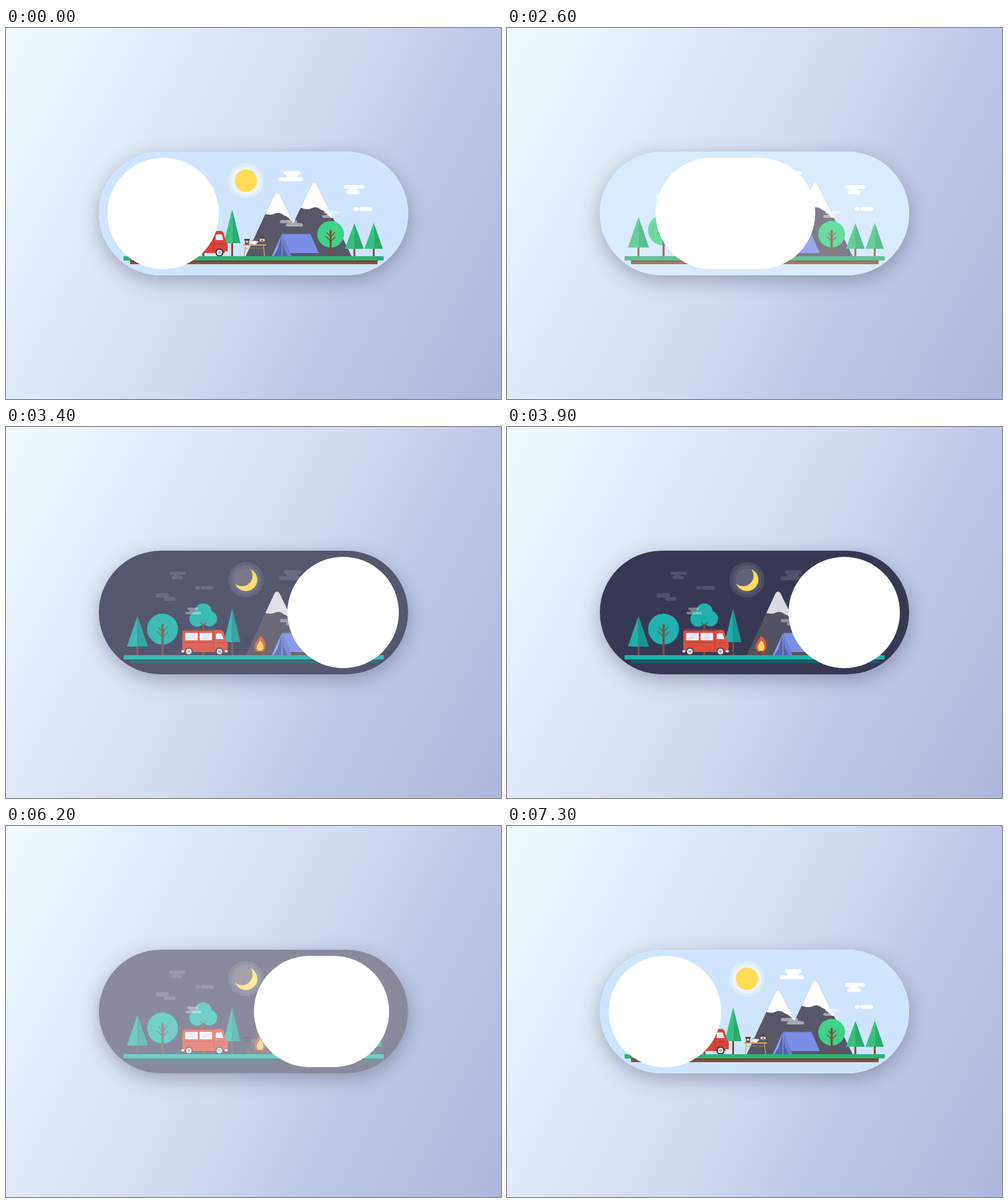
Animation, 800 px wide and 600 px high, one loop 7.4 s. Source, as an HTML page with a canvas:

```html
<!DOCTYPE html>
<html lang="en">
<head>
<meta charset="utf-8">
<title>Day and night switch</title>
<style>
  html, body { margin: 0; width: 100%; height: 100%; overflow: hidden; }
  canvas { display: block; width: 800px; height: 600px; }
</style>
</head>
<body>
<canvas id="stage" width="800" height="600"></canvas>
<script>
const LOOP = 7400;
const ctx = document.getElementById('stage').getContext('2d');

const DAY = {
  sky: '#cfe5ff', halo: '#dfedfb', ring: '#ecf4fa', disc: '#ffdc55',
  cloud: '#ffffff', mist: 'rgba(255,255,255,.48)',
  rock: '#575767', snow: '#ffffff',
  leaf: '#3dd286', pineL: '#36c27d', pineR: '#2cab6d', trunk: '#7f4c36',
  grass: '#2eb277', soil: '#8b4f3b', soilTop: '#6f3d2e',
  van: '#d7443a', rack: '#74383a', tyre: '#35333f', hub: '#f3f3f6'
};
const NIGHT = {
  sky: '#373854', halo: '#4a4b64', ring: '#57586f', disc: '#62627a',
  cloud: '#50516a', mist: 'rgba(255,255,255,.35)',
  rock: '#535260', snow: '#dadae0',
  leaf: '#20b0ad', pineL: '#20aeaa', pineR: '#1a9697', trunk: '#6b5549',
  grass: '#1fb0ac', soil: '#1c5f6b', soilTop: '#1a5763',
  van: '#da4f40', rack: '#6b4048', tyre: '#4a4654', hub: '#e6e6ec'
};

function circle(c, x, y, r, color) {
  c.fillStyle = color;
  c.beginPath();
  c.arc(x, y, r, 0, Math.PI * 2);
  c.fill();
}

function box(c, x1, y1, x2, y2, color, r = 0) {
  c.fillStyle = color;
  c.beginPath();
  c.roundRect(x1, y1, x2 - x1, y2 - y1, r);
  c.fill();
}

function poly(c, color, ...p) {
  c.fillStyle = color;
  c.beginPath();
  for (let i = 0; i < p.length; i += 2) c.lineTo(p[i], p[i + 1]);
  c.closePath();
  c.fill();
}

function line(c, color, width, ...p) {
  c.strokeStyle = color;
  c.lineWidth = width;
  c.beginPath();
  for (let i = 0; i < p.length; i += 2) c.lineTo(p[i], p[i + 1]);
  c.stroke();
}

const bar = (c, x1, y1, x2, y2, color) => box(c, x1, y1, x2, y2, color, (y2 - y1) / 2);

// Two bars joined by a narrower bridge
function cloud(c, color, x, y, top, dx, bottom, h, gap) {
  c.fillStyle = color;
  const low = y + h + gap, mid = x + Math.max(0, dx) + 4;
  const midW = Math.min(top, bottom) - 9;
  c.beginPath();
  c.roundRect(x, y, top, h, h / 2);
  c.roundRect(x + dx, low, bottom, h, h / 2);
  c.rect(mid, y + h - .5, midW, gap + 1);
  c.fill();
}

function luminary(c, p, night) {
  circle(c, 387.8, 247, 28.5, p.halo);
  circle(c, 387.8, 247, 23.5, p.ring);
  circle(c, 387.8, 247, 18, p.disc);
  if (!night) return;
  c.save();
  c.beginPath();
  c.arc(387.8, 247, 18.5, 0, Math.PI * 2);
  c.clip();
  c.fillStyle = '#fddc5e';
  c.beginPath();
  c.rect(360, 220, 60, 60);
  c.arc(381.5, 240.5, 17, 0, Math.PI * 2);
  c.fill('evenodd');
  c.restore();
}

function mountain(c, p, x, y, left, right, snow) {
  c.save();
  c.beginPath();
  c.moveTo(left, 370);
  c.lineTo(x - 4, y + 3);
  c.quadraticCurveTo(x, y - 3, x + 4, y + 3);
  c.lineTo(right, 370);
  c.closePath();
  c.fillStyle = p.rock;
  c.fill();
  c.clip();
  c.fillStyle = p.snow;
  c.beginPath();
  c.moveTo(x, y - 5);
  c.lineTo(x - 40, y - 5);
  c.lineTo(x - 40, snow);
  c.lineTo(x - 21, snow);
  c.quadraticCurveTo(x - 10, snow + 4, x - 3, snow);
  c.quadraticCurveTo(x + 4, snow - 3, x + 11, snow + 3);
  c.quadraticCurveTo(x + 18, snow + 5, x + 27, snow + 16);
  c.lineTo(x + 45, snow + 16);
  c.lineTo(x + 45, y - 5);
  c.fill();
  c.restore();
}

function pine(c, p, x, top, base, half) {
  box(c, x - 1.5, base - 1, x + 1.5, 370, p.trunk);
  poly(c, p.pineL, x, top, x, base, x - half, base);
  poly(c, p.pineR, x, top, x + half, base, x, base);
}

function roundTree(c, p, x, y, r) {
  const k = r / 25;
  circle(c, x, y, r, p.leaf);
  box(c, x - 1.7, y - 8 * k, x + 1.7, 370, p.trunk, 1);
  line(c, p.trunk, 1.5, x - 9 * k, y + 4 * k, x, y + 13 * k, x + 9 * k, y + 5 * k);
  line(c, p.trunk, 1.5, x - 7 * k, y - 3 * k, x, y + 5 * k, x + 8 * k, y - 4 * k);
}

function bushTree(c, p) {
  box(c, 317.3, 318, 320.5, 370, p.trunk);
  circle(c, 319, 298.5, 13.3, p.leaf);
  circle(c, 308.7, 310.5, 12.4, p.leaf);
  circle(c, 328.8, 310, 12.4, p.leaf);
  line(c, p.trunk, 1.5, 314, 316, 319, 321, 324, 316);
}

function wheel(c, p, x) {
  circle(c, x, 363, 6.6, p.tyre);
  circle(c, x, 363, 4.6, p.hub);
  circle(c, x, 363, 2.3, '#a9a9b4');
}

function van(c, p) {
  box(c, 286, 326.5, 339, 329, p.rack, 1);
  c.fillStyle = p.van;
  c.beginPath();
  c.moveTo(285, 331);
  c.quadraticCurveTo(285, 329.5, 287, 329.5);
  c.lineTo(336, 329.5);
  c.quadraticCurveTo(340, 327.5, 346, 328);
  c.quadraticCurveTo(351, 328, 352.5, 334);
  c.lineTo(355, 345);
  c.quadraticCurveTo(358.5, 347, 358.5, 352);
  c.lineTo(358, 364);
  c.lineTo(285, 364);
  c.fill();
  const glass = '#eeedf6';
  box(c, 289.5, 333, 310, 345, glass, 1);
  box(c, 313, 333, 333, 345, glass, 1);
  poly(c, glass, 339, 335, 341, 333.8, 348.5, 333.8, 351.5, 343, 339, 343);
  for (const x of [294, 318]) {
    line(c, '#d5d5e8', 1.5, x, 343, x + 7, 335);
    line(c, '#d5d5e8', 1.5, x + 4, 343, x + 11, 335);
  }
  const seam = 'rgba(90,20,30,.4)';
  line(c, seam, .8, 287, 348.5, 335, 348.5);
  line(c, seam, .8, 336, 332, 336, 360);
  line(c, seam, 1, 341, 349, 353, 349);
  wheel(c, p, 295.5);
  wheel(c, p, 345);
  box(c, 283.5, 361, 288, 364.5, '#e9e5e8', 1);
  box(c, 353.5, 361, 358.5, 364.5, '#e9e5e8', 1);
}

function tent(c) {
  poly(c, '#7b8ee5', 446, 333, 492, 333, 505.5, 364, 459, 364);
  poly(c, '#5063ad', 446, 333, 461, 369, 430, 369);
  poly(c, '#8ba0f0', 446, 333, 439, 358, 432, 369.5, 429.5, 369.5);
  poly(c, '#6f80d4', 446, 333, 461.5, 369.5, 456, 369.5, 449, 357);
  line(c, '#8b95cc', 1.5, 446, 336, 446, 369);
  line(c, '#5c6cc0', .8, 446, 333, 492, 333);
}

function table(c) {
  const wood = '#dba257';
  box(c, 383, 350, 420, 352, wood);
  line(c, wood, 1.3, 387, 352, 385, 369);
  line(c, wood, 1.3, 416, 352, 418, 369);
  line(c, '#c08b4d', .7, 386, 356, 417, 356);
  box(c, 385, 341, 394, 343.5, '#4e4547', .5);
  box(c, 386, 343, 393, 350, '#69544e');
  box(c, 387.5, 344.5, 391.5, 347, '#e9e5e2');
  box(c, 397, 344, 405, 350, '#ffffff', 2);
  line(c, '#5e5558', .8, 396.5, 344, 406, 344);
  circle(c, 406, 346, 1.4, '#eeeeee');
  box(c, 411, 336.5, 417, 341, '#5a4a4c', 1);
  box(c, 410, 341, 418, 345, '#e5e7e8', 1);
  box(c, 411, 345, 417, 350, '#3c6973');
  box(c, 412.5, 342, 415.5, 346.5, '#bc654a');
}

function flame(c, x, top, bottom, half, color) {
  const h = bottom - top;
  c.fillStyle = color;
  c.beginPath();
  c.moveTo(x, top);
  c.bezierCurveTo(x + half * .8, top + h * .15, x + half * 1.1, top + h * .4, x + half, top + h * .65);
  c.bezierCurveTo(x + half * .9, bottom, x - half * .9, bottom, x - half, top + h * .65);
  c.bezierCurveTo(x - half * 1.1, top + h * .4, x - half * .5, top + h * .3, x, top);
  c.fill();
}

function campfire(c) {
  line(c, '#70463f', 3, 402, 368, 417, 361);
  line(c, '#875044', 3, 418, 368, 403, 361);
  flame(c, 410.5, 338, 367, 8.8, '#dc5a3d');
  flame(c, 410.5, 345, 364, 5.3, '#fcd663');
  line(c, '#70463f', 2, 405, 369, 410, 363, 415, 369);
}

function paintScene(p, night) {
  const cv = document.createElement('canvas');
  cv.width = 800;
  cv.height = 600;
  const c = cv.getContext('2d');
  box(c, 150, 200, 650, 400, p.sky);
  luminary(c, p, night);

  cloud(c, p.cloud, 264, 234, 27, 3.5, 18, 5, 2);
  cloud(c, p.cloud, 449, 231.5, 27, -7.5, 38.5, 6.3, 3.7);
  cloud(c, p.cloud, 546.5, 254, 32, 3.5, 21.5, 6, 2.5);
  bar(c, 241.5, 268.5, 263.5, 276, p.cloud);
  bar(c, 255.5, 275, 274, 281.3, p.cloud);
  for (const [x, y] of [[306, 257], [562, 289.5]]) {
    bar(c, x, y, x + 8, y + 6.2, p.cloud);
    bar(c, x + 9, y, x + 30, y + 6.2, p.cloud);
  }

  mountain(c, p, 438, 266, 387, 492, 300);
  mountain(c, p, 498, 250, 439, 559, 291);
  cloud(c, p.mist, 442.5, 310.5, 28, 10, 27.5, 5.3, 0);
  cloud(c, p.mist, 514, 296, 25, -3, 20, 4.5, 2);

  pine(c, p, 212.5, 305, 355, 17);
  pine(c, p, 365.5, 293, 348, 13.5);
  pine(c, p, 563, 315.5, 357, 15.2);
  pine(c, p, 594.3, 315, 357, 14.8);
  roundTree(c, p, 253, 326.8, 25);
  bushTree(c, p);
  cloud(c, p.mist, 293, 292, 17.5, -3, 25.5, 4.2, 2.6);

  if (night) campfire(c); else table(c);
  tent(c);
  roundTree(c, p, 524.7, 333.6, 21.6);
  van(c, p);

  box(c, 200.5, 375, 600.5, 382, p.soil);
  box(c, 200.5, 375, 600.5, 378, p.soilTop);
  box(c, 190, 369, 610.5, 376, p.grass, 1);
  return cv;
}

function paintBack() {
  const cv = document.createElement('canvas');
  cv.width = 800;
  cv.height = 600;
  const c = cv.getContext('2d');
  const g = c.createLinearGradient(0, 0, 879, 454);
  ['#f0fbff', '#e0eaf6', '#d3dcf0', '#bcc7e5', '#afb6dc']
    .forEach((color, i) => g.addColorStop([0, .28, .5, .72, 1][i], color));
  c.fillStyle = g;
  c.fillRect(0, 0, 800, 600);
  c.shadowColor = 'rgba(50,50,90,.36)';
  c.shadowBlur = 32;
  c.shadowOffsetY = 9;
  box(c, 150, 200, 650, 400, '#fff', 100);
  return cv;
}

const back = paintBack();
const dayScene = paintScene(DAY, false);
const nightScene = paintScene(NIGHT, true);

const ramp = (t, a, b) => Math.min(1, Math.max(0, (t - a) / (b - a)));
const smooth = u => u * u * (3 - 2 * u);
const quad = u => u < .5 ? 2 * u * u : 1 - 2 * (1 - u) ** 2;

function pose(t) {
  if (t < 2000) return { x: 254, w: 180, day: 1, night: 0 };
  const out = t < 5900;
  const u = out ? ramp(t, 1940, 3424) : ramp(t, 5817, 7377);
  const p = quad(u);
  return {
    x: 254 + 291 * (out ? p : 1 - p),
    w: 180 + 80 * quad(1 - Math.abs(2 * u - 1)),
    day: out ? 1 - smooth(ramp(t, 2000, 3900)) : smooth(ramp(t, 5900, 7100)),
    night: out ? smooth(ramp(t, 2650, 3650)) : 1 - smooth(ramp(t, 5870, 6600))
  };
}

function draw(now) {
  // The motion advances in steps of 100 ms
  const s = pose(Math.floor(now % LOOP / 100) * 100);
  ctx.drawImage(back, 0, 0);
  ctx.save();
  ctx.beginPath();
  ctx.roundRect(150, 200, 500, 200, 100);
  ctx.clip();
  ctx.globalAlpha = s.day;
  ctx.drawImage(dayScene, 0, 0);
  ctx.globalAlpha = s.night;
  ctx.drawImage(nightScene, 0, 0);
  ctx.restore();
  box(ctx, s.x - s.w / 2, 210, s.x + s.w / 2, 390, '#fff', 90);
}

let start;
function tick(now) {
  start ??= now;
  draw(now - start);
  requestAnimationFrame(tick);
}
draw(0);
requestAnimationFrame(tick);
</script>
</body>
</html>
```
